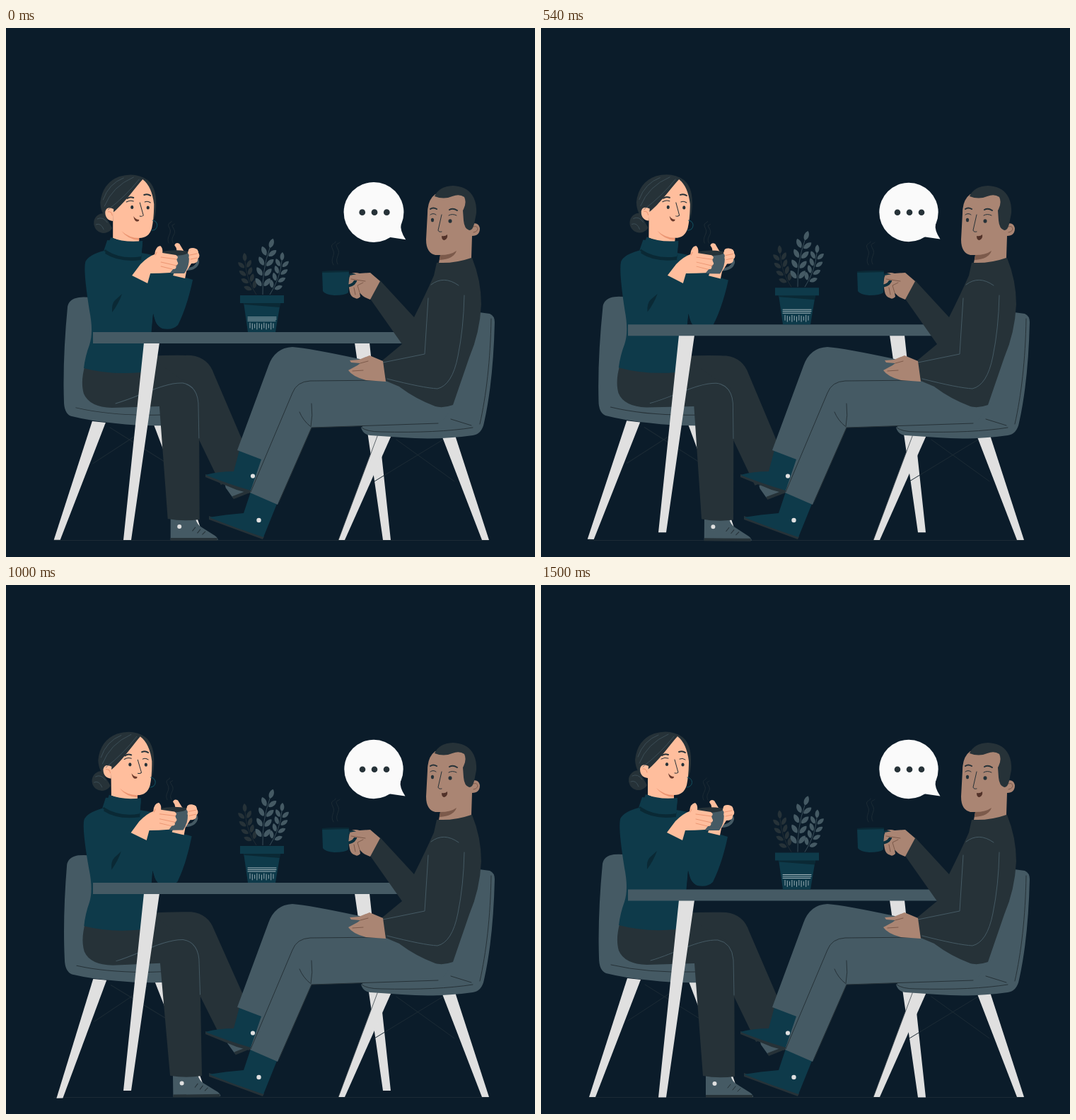
Animation of 748x748 px, one loop 1.54 s. Source, as an HTML page:

```html
<!DOCTYPE html>
<html lang="en">
<head>
<meta charset="utf-8">
<title>Coffee talk</title>
<style>
html, body { margin: 0; width: 100%; height: 100%; overflow: hidden; background: #0b1c2a; }
svg { display: block; width: 100vw; height: 100vh; }
.dark { fill: #263238; }
.slate { fill: #455a64; }
.teal { fill: #0e3a4a; }
.deep { fill: #0a2935; }
.white { fill: #e0e0e0; }
.skin { fill: #ffbe9d; }
.tan { fill: #aa8573; }
.line { fill: none; stroke: #263238; stroke-width: 1; stroke-linecap: round; stroke-linejoin: round; }
.soft { stroke: #455a64; }
.faint { stroke: #1c2b35; }
.pale { stroke: #cfd8dc; }
.bold { stroke-width: 2; }
.peach { stroke: #eb9673; }
.brown { stroke: #7c5a4b; }
</style>
</head>
<body>
<svg viewBox="0 0 748 748">
  <path class="line faint" d="M68 724.5H682"/>

  <g id="woman">
    <!-- chair -->
    <path class="line faint" d="M123 616L198 567M147 565L224 613"/>
    <path class="white" d="M208 558H226L281 724H271Z"/>
    <path class="white" d="M122 556L141 558L77 724H68Z"/>
    <path class="slate" d="M124 382Q113 380 103 381Q89 383 87 394Q80 468 82 527Q82 545 92 549Q120 556 155 559Q190 563 228 562V520L130 480Z"/>
    <path class="line" d="M99 537Q150 549 220 547"/>
    <!-- far leg -->
    <path class="slate" d="M310 646L335 636L350 652L321 664L311 650Z"/>
    <path class="dark" d="M320 662L346 652L347 656L322 666Z"/>
    <path class="dark" d="M200 464Q235 462 262 463Q286 466 294 489L334 582Q344 612 350 630L304 646L272 580L250 520Z"/>
    <!-- near leg -->
    <path class="slate" d="M233 693H268Q270 702 277 706L296 718Q300 721 300 724H233Z"/>
    <path class="dark" d="M233 721H299V725H233Z"/>
    <path class="line" d="M264 711L268 706M271 714L275 709M278 716L282 712"/>
    <circle cx="245.500" cy="705" r="3" fill="#e0e0e0"/>
    <path class="dark" d="M112 476Q105 500 110 517Q118 536 150 537L217 535L229 694Q250 698 274 695L273 526Q272 501 245 495L200 462L192 470Z"/>
    <path class="line soft" d="M155 531C190 521 222 501 250 502Q270 506 272 530L273 580"/>
    <!-- sweater -->
    <path class="teal" d="M143 300L138 315Q116 321 112 331Q109 345 118 400Q124 430 118 448Q112 464 110 481Q148 491 191 487L204 446L208 404Q211 421 221 425Q235 428 243 420Q256 394 264 356L240 349L226 328Q212 321 191 318L193 304Z"/>
    <path fill="#0b1c2a" d="M208 404L212 418Q214 421 217 424L206 430Z"/>
    <path class="deep" d="M150 402Q149 390 154 385L164 376Q159 390 150 402ZM138 315Q161 330 191 325L192 321Q164 326 141 313Z"/>
    <!-- neck and head -->
    <path class="dark" d="M138 262A14 14 0 1 0 150 283Z"/>
    <path class="dark" d="M149 271Q134 268 133 247Q136 219 160 210Q183 203 200 215Q212 225 212 247Q212 264 208 273Z"/>
    <path class="skin" d="M193 214C183 225 167 248 151 261L151 297Q169 305 188 303V297Q202 297 206 283Q209 269 209 249Q206 224 193 214Z"/>
    <path fill="#eb9673" d="M163 287Q174 297 188 297V300Q172 299 163 287Z"/>
    <path class="skin" d="M152 256Q142 251 140 260Q140 272 151 273Z"/>
    <path class="line peach" d="M144 260Q149 259 150 265"/>
    <path class="line soft" style="stroke-width:.7" d="M137 243Q145 220 166 212M139 252Q150 224 180 211M144 257Q169 238 188 214M129 270Q137 266 143 275M127 278Q134 275 138 285"/>
    <path class="line" style="stroke:#12505f" d="M207 272A7 7 0 0 1 206 286"/>
    <path class="line bold" d="M171 241Q175 238 180 240M195 236Q200 234 204 237"/>
    <path class="line" d="M170 246Q175 243 180 245M196 246Q200 244 204 247"/>
    <ellipse class="dark" cx="178" cy="253.500" rx="2.100" ry="2.600"/>
    <ellipse class="dark" cx="200.500" cy="254" rx="2.100" ry="2.600"/>
    <path class="line" d="M189 247L194 265Q192 267 189 266"/>
    <path fill="#6b3a2c" d="M180 266Q183 271 188 271Q188 274 184 273.500Q181 272 180 266Z"/>
    <path class="teal" d="M148 296Q168 304 193 301L191 327Q160 329 141 314Z"/>
    <path class="deep" d="M141 314Q163 328 191 323V328Q160 332 140 319Z"/>
    <!-- cup and hands -->
    <path class="line faint" d="M230 304C225 295 236 291 231 283S234 276 234 273M236 304C231 295 242 292 237 284S236 280 238 277"/>
    <path class="line" style="stroke:#455a64;stroke-width:4" d="M259 324Q271 322 271 331Q269 340 256 341"/>
    <path class="skin" d="M240 318Q243 313 238 307Q240 302 245 305L251 315L258 318Q256 311 264 311Q272 312 272 318Q275 323 271 326Q272 333 262 333L255 344L253 354L236 350L240 340Z"/>
    <path class="slate" d="M217 317H258Q261 335 252 347H234Q220 342 217 317Z"/>
    <path class="dark" d="M217 317Q236 312 258 316Q258 321 239 322Q221 322 217 317Z"/>
    <path class="skin" d="M258 315Q264 309 270 313Q272 316 271 319Q275 323 271 326Q269 330 261 328Q256 325 260 321Q255 319 258 315Z"/>
    <path class="line peach" d="M260 321L270 319M261 327L270 325"/>
    <path class="skin" d="M178 350L190 334Q201 323 210 320Q211 309 218 308Q222 311 221 318L240 321Q245 324 241 327L242 330Q245 334 240 336Q242 341 236 341L232 346Q217 347 204 347L200 361Z"/>
    <path class="line peach" d="M219 324L241 327M219 331L241 336M219 337L235 341M213 317L211 321"/>
  </g>

  <g id="table">
    <path class="white" d="M195 445H217L177 724H166ZM493 445H514L544 724H533Z"/>
    <path class="slate" d="M123 430H610V446H123Z"/>
    <g id="plant"></g>
    <path class="teal" d="M336 388H388L381 430H342Z"/>
    <path class="deep" d="M336 388H388L387 395L337 391Z"/>
    <path class="teal" d="M331 378H393V389H331Z"/>
    <path class="line pale" style="stroke-width:.8" d="M342 409H382M342 411.500H382M342 414H381"/>
    <path id="fringe" class="line pale" style="stroke-width:.7"/>
  </g>

  <g id="man">
    <!-- chair -->
    <path class="line faint" d="M521 641L618 582M552 582L634 641"/>
    <path class="white" d="M526 574L545 576L479 724H470Z"/>
    <path class="line" style="stroke-width:.7" d="M525.500 576L470 724"/>
    <path class="white" d="M616 576L635 576L683 724H673Z"/>
    <path class="slate" d="M669 402L684 404Q691 407 691 416Q689 500 676 558Q673 574 660 576Q610 583 560 579L515 576Q505 575 502 565L560 520L640 500Z"/>
    <path class="line" d="M503 565Q510 571 530 571Q610 573 660 565M629 553L658 562M686 411C685 470 679 520 670 560"/>
    <!-- far boot -->
    <path class="dark" d="M282 631L346 653L344 658L326 653L282 635Z"/>
    <path class="teal" d="M330 597L364 609L346 654Q315 645 282 632Q300 627 322 627Z"/>
    <circle cx="349" cy="633.500" r="3.100" fill="#e0e0e0"/>
    <!-- near boot -->
    <path class="dark" d="M287 690L365 719L363 723L287 695Z"/>
    <path class="teal" d="M346 656L383 673L364 720Q325 707 287 692Q310 688 336 686Z"/>
    <circle cx="357.500" cy="696" r="3.200" fill="#e0e0e0"/>
    <!-- trousers -->
    <path class="slate" d="M327 597L371 478Q380 452 405 451Q430 453 500 468L560 500L631 531Q626 551 611 559L432 565L384 674L345 657L361 610Z"/>
    <path class="line" d="M537 498L430 499Q411 500 405 516L346 656M611 559L432 565L386 670M432 531Q434 548 431 564M415 543Q420 555 430 563"/>
    <!-- sweater -->
    <path class="dark" d="M609 332L659 325Q672 357 672 391Q670 431 655 466L632 533Q618 538 607 535Q578 524 556 507L537 499L531 471L560 447L515 383L529 357L577 409Q594 375 605 350Z"/>
    <path class="line soft" d="M597 382L592 461L533 473M601 363Q619 349 640 364M648 378Q647 425 639 464Q631 505 610 510Q590 509 539 496"/>
    <!-- resting hand -->
    <path class="tan" d="M486 470L499 469L514 463L533 471L537 500L509 498Q490 493 484 484L497 477L501 474L488 473Z"/>
    <path class="line brown" d="M501 474L512 471M490 485L505 484"/>
    <!-- cup and hand -->
    <path class="line faint" d="M463 335C457 326 467 322 462 313S466 306 466 302M469 334C464 325 474 320 469 312S470 306 472 303"/>
    <path class="tan" d="M486 349Q491 344 500 347L515 346L529 358L515 384Q505 381 500 374L501 380Q497 384 494 382Q487 380 486 373L484 362Z"/>
    <path class="line brown" d="M500 374L497 364L505 360M492 367L494 377"/>
    <path class="line" style="stroke:#0c303d;stroke-width:4" d="M484 350Q495 347 495 354Q494 363 483 365"/>
    <path class="tan" d="M486 350Q495 347 503 350L509 357L494 357Q487 357 486 350Z"/>
    <path class="line brown" d="M488 355L508 358"/>
    <path class="teal" d="M447 344L485 343L484 374Q480 378 464 378Q451 377 448 372Z"/>
    <path class="deep" d="M447 344L485 343V345L447 346Z"/>
    <!-- head -->
    <path class="tan" d="M607 235Q596 243 596 262L594 299Q594 318 607 321L614 321L612 332Q635 333 658 325L659 294Q670 294 670 283Q668 274 659 277L655 240L632 229Z"/>
    <path fill="#7c5a4b" d="M614 321Q629 321 637 315Q633 327 613 328Z"/>
    <path class="dark" d="M606 238Q612 224 632 223Q651 224 659 236Q666 246 665 262L662 277Q660 286 655 286Q648 284 647 272L646 258Q652 247 648 239Q641 234 631 238Q619 243 606 238Z"/>
    <path class="line brown" d="M661 281Q667 279 667 285Q665 289 661 289"/>
    <path class="line bold" d="M600 256Q604 253 609 256M627 257Q632 254 638 258"/>
    <path class="line" d="M600 264Q604 261 608 264M626 265Q631 262 637 265M616 264L611 286Q612 289 616 288"/>
    <ellipse class="dark" cx="603" cy="271.500" rx="2.100" ry="2.700"/>
    <ellipse class="dark" cx="628" cy="273" rx="2.500" ry="2.700"/>
    <path fill="#523229" d="M616 294Q621 295 624 292Q625 298 620 300Q616 300 616 294Z"/>
  </g>

  <g id="bubble">
    <circle cx="520" cy="260.500" r="41.700" fill="#fafafa"/>
    <path fill="#fafafa" d="M558 277Q556 286 564.500 298.500L540 295Z"/>
    <circle class="dark" cx="504" cy="260.700" r="4.300"/>
    <circle class="dark" cx="521" cy="260.700" r="4.300"/>
    <circle class="dark" cx="538" cy="260.700" r="4.300"/>
  </g>
</svg>
<script>
const $ = id => document.getElementById(id);
const LOOP = 1540, CYCLE = 1500, LEAD = 25;

// A pointed leaf that starts a short stalk away from its joint.
function leaf(x, y, deg, len, stalk) {
  const w = len * 0.32;
  return `<path transform="translate(${x} ${y}) rotate(${deg}) translate(0 ${-stalk})" d="M0 0C${-w} ${-len * .2} ${-w} ${-len * .75} 0 ${-len}C${w} ${-len * .75} ${w} ${-len * .2} 0 0Z"/>`;
}

// A curved stem with paired leaves and one at the tip.
function sprig(color, [x0, y0], [cx, cy], [x1, y1], pairs, len) {
  let out = `<path d="M${x0} ${y0}Q${cx} ${cy} ${x1} ${y1}" fill="none" stroke="${color}" stroke-width=".8"/>`;
  for (let i = 0; i <= pairs; i++) {
    const u = 0.14 + 0.86 * i / pairs, v = 1 - u;
    const x = v * v * x0 + 2 * u * v * cx + u * u * x1;
    const y = v * v * y0 + 2 * u * v * cy + u * u * y1;
    const dx = v * (cx - x0) + u * (x1 - cx), dy = v * (cy - y0) + u * (y1 - cy);
    const turn = Math.atan2(dx, -dy) * 180 / Math.PI;
    const tip = i === pairs;
    for (const a of tip ? [0] : [-38, 38]) {
      out += leaf(x.toFixed(1), y.toFixed(1), (turn + a).toFixed(1), len, tip ? 0 : 3);
    }
  }
  return `<g fill="${color}">${out}</g>`;
}

$('plant').innerHTML =
  sprig('#263238', [354, 377], [340, 357], [338, 330], 4, 12) +
  sprig('#455a64', [373, 377], [388, 354], [390, 329], 4, 12) +
  sprig('#455a64', [363, 377], [362, 342], [373, 311], 4, 14);

let fringe = '';
for (let i = 0; i < 11; i++) fringe += `M${345 + i * 3.3} ${417 + i % 3}V${424 + i * 2 % 4}`;
$('fringe').setAttribute('d', fringe);

// Linear interpolation through [position, value] stops.
function track(p, stops) {
  for (let i = 1; i < stops.length; i++) {
    const [a, x] = stops[i - 1], [b, y] = stops[i];
    if (p <= b) return x + (y - x) * (p - a) / (b - a);
  }
  return stops[stops.length - 1][1];
}

const float = [[0, 0.5], [.5, -14.5], [1, 0.5]];
const sway = [[0, 0], [.25, 1], [.75, -1], [1, 0]];
const beat = [[0, 1], [.1, 1.1], [.3, 1], [.4, 1], [.5, 1.1], [.6, 1], [1, 1]];

function draw(ms) {
  const p = Math.min(ms % LOOP + LEAD, CYCLE) / CYCLE;
  $('table').setAttribute('transform', `translate(0 ${track(p, float)})`);
  $('woman').setAttribute('transform', `rotate(${track(p, sway)} 205 460)`);
  $('bubble').setAttribute('transform', `translate(520 260.5) scale(${track(p, beat)}) translate(-520 -260.5)`);
}

const start = performance.now();
function tick() {
  draw(performance.now() - start);
  requestAnimationFrame(tick);
}
draw(0);
requestAnimationFrame(tick);
</script>
</body>
</html>
```
